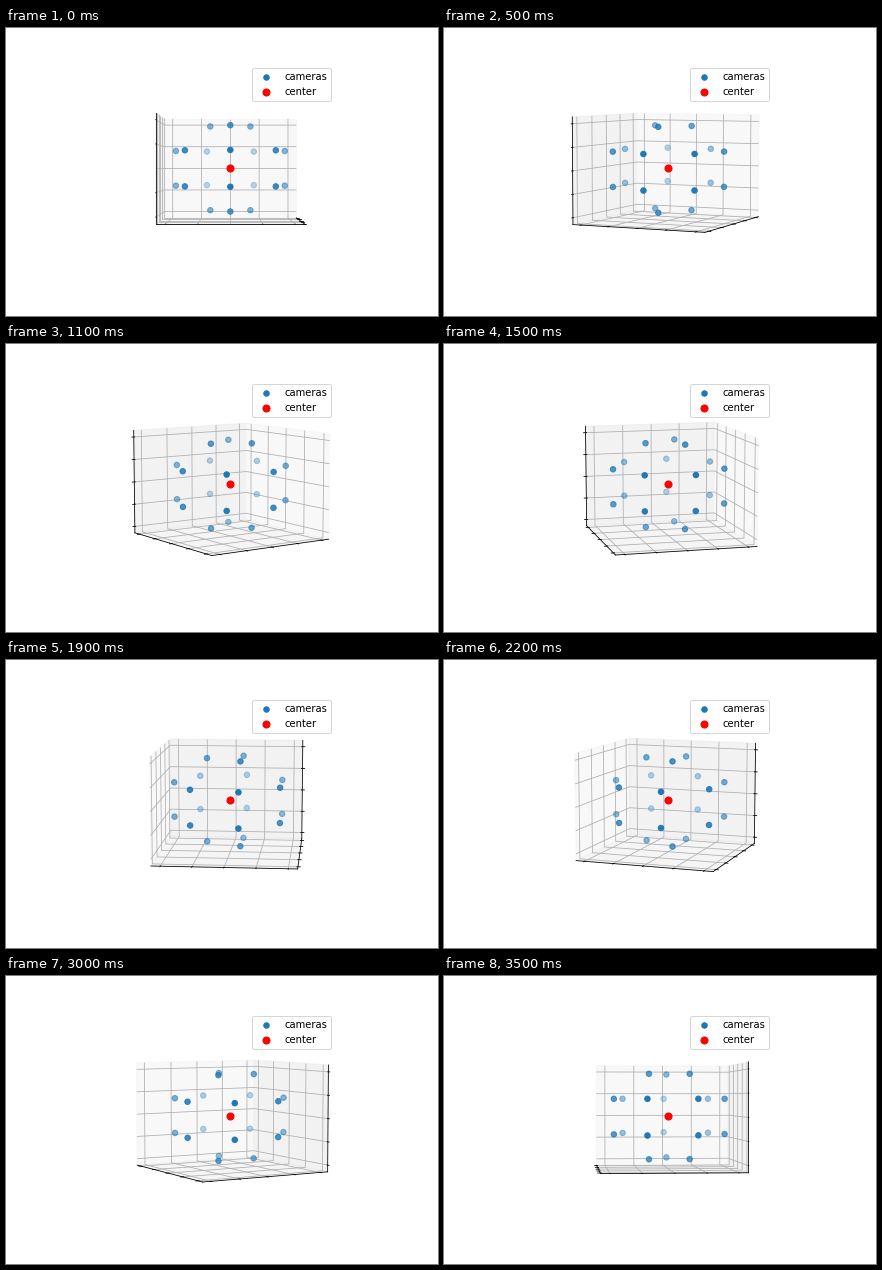
A matplotlib script for the animation above (3.6 s loop, 432x288 px).

```python
import numpy as np
import matplotlib.pyplot as plt
from matplotlib.animation import FuncAnimation

FRAMES, STEP = 36, 5            # frames per loop, degrees per frame
TILT = 10                       # highest camera elevation, degrees
LIMIT = 1.1 * 25 / 24


def ring(lat, count):
    """Evenly spaced points on one latitude of the unit sphere."""
    lat = np.radians(lat)
    lon = 2 * np.pi * np.arange(count) / count
    return np.column_stack([np.cos(lat) * np.cos(lon),
                            np.cos(lat) * np.sin(lon),
                            np.full(count, np.sin(lat))])


cameras = np.vstack([ring(lat, n) for lat, n in
                     ((-67.5, 3), (-22.5, 7), (22.5, 7), (67.5, 3))])

fig = plt.figure(figsize=(6, 4), dpi=72, facecolor="white")
fig.subplots_adjust(left=0.125, right=0.9, bottom=0.125, top=0.88)
ax = fig.add_subplot(projection="3d")
ax.scatter(*cameras.T, s=30, label="cameras")
ax.scatter([0], [0], [0], s=50, c="red", label="center")
ax.set(xlim=(-LIMIT, LIMIT), ylim=(-LIMIT, LIMIT), zlim=(-LIMIT, LIMIT))
for axis in (ax.xaxis, ax.yaxis, ax.zaxis):
    axis.set_ticks(np.linspace(-1, 1, 5), labels=[""] * 5)
ax.legend(loc="upper right")


def update(i):
    azim = STEP * i
    ax.view_init(elev=TILT * np.sin(np.radians(azim)), azim=azim)
    return []


anim = FuncAnimation(fig, update, frames=FRAMES, interval=100,
                     init_func=lambda: update(0), repeat=True, repeat_delay=0)
plt.show()
```
